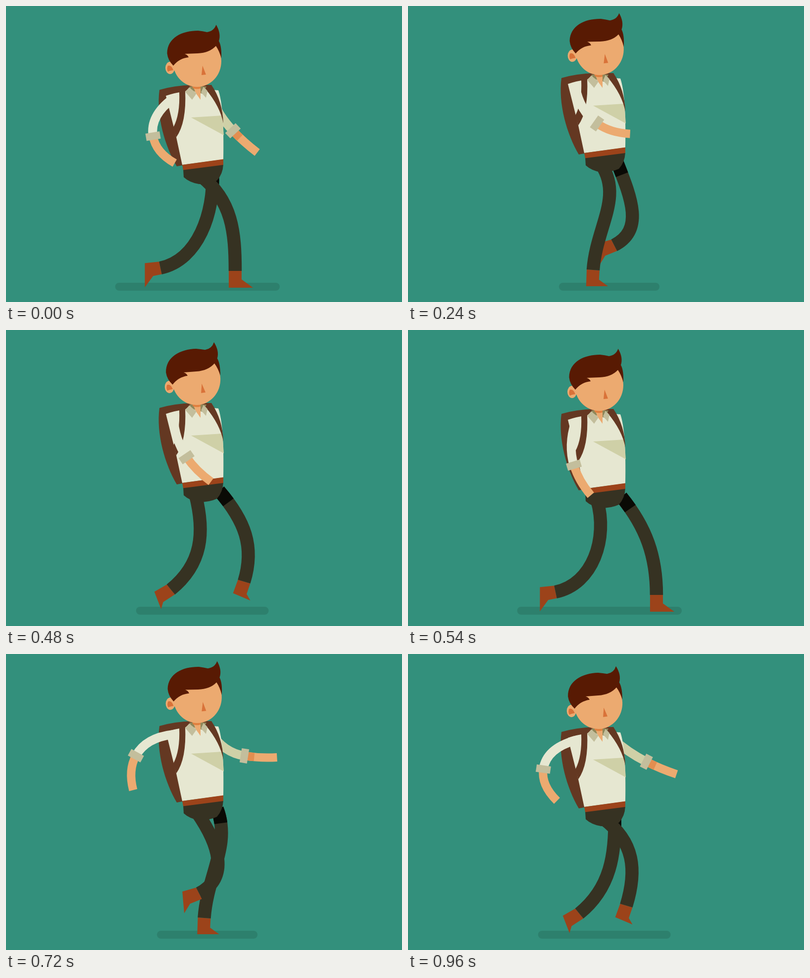
An HTML page with a canvas that plays this animation: 800x600 px, repeating every 1.02 s.

```html
<!DOCTYPE html>
<html lang="en">
<head>
<meta charset="utf-8">
<title>Walk cycle</title>
<style>
html, body { margin: 0; width: 100%; height: 100%; overflow: hidden; background: #33907c; }
canvas { display: block; }
</style>
</head>
<body>
<canvas id="stage" width="800" height="600"></canvas>
<script>
const ctx = document.getElementById('stage').getContext('2d');
const STEP = 60, LOOP = 1020, POSES = 16;
const BACK = '#33907c', SKIN = '#ecaa70', ORANGE = '#d97239', HAIR = '#581a03', PACK = '#643822',
  SHIRT = '#e6e7d1', SHADE = '#cfd0a7', CUFF = '#c3be9c', PANTS = '#363222', LEATHER = '#9c431a';

// Ankle path of one leg: step, x, y, backward lean of the shin in degrees
const STRIDE = [
  [0, 463, 537, 0], [3, 374, 535, 4], [5, 370, 530, 11], [7, 333, 526, 51], [8, 298, 531, 78],
  [9, 339, 511, 77], [11, 390, 485, 63], [13, 405, 487, 60], [15, 441, 510, 17]
];
// Swings as [mean, amplitude, peak step] in degrees; 0 hangs down, + is forward
const NEAR_ARM = { x: 338, y: 187, reach: 87, hand: 70,
  upper: [-15, -56, 12.6], cuff: [13, -47, 12.2], lower: [34, -40, 11.7] };
const FAR_ARM = { x: 414, y: 184, reach: 82, hand: 66,
  upper: [6, 70, 13], cuff: [35, 54, 12.4], lower: [42, 52, 12.3] };

const wave = (i, peak = 0) => Math.cos(2 * Math.PI * (i - peak) / POSES);
const swing = (i, [mean, size, peak]) => mean + size * wave(i, peak);

// Point at a distance and an angle from straight down
function go([x, y], deg, dist) {
  const a = deg * Math.PI / 180;
  return [x + Math.sin(a) * dist, y + Math.cos(a) * dist];
}

function stride(p) {
  const a = STRIDE.findLastIndex(k => k[0] <= p);
  const from = STRIDE[a], to = STRIDE[(a + 1) % STRIDE.length];
  const u = (p - from[0]) / ((to[0] || POSES) - from[0]);
  return from.slice(1).map((v, n) => v + (to[n + 1] - v) * u);
}

function fill(d, color) {
  ctx.fillStyle = color;
  ctx.fill(new Path2D(d));
}

function tube(d, width, color, length) {
  ctx.strokeStyle = color;
  ctx.lineWidth = width;
  ctx.setLineDash(length ? [length, 2000] : []);
  ctx.stroke(new Path2D(d));
}

function leg(i, lift, far) {
  const p = (i + (far ? 8 : 0)) % POSES, planted = p < 6;
  const [x, y, lean] = stride(p);
  // The far leg takes longer steps
  const ankle = [far ? x + 26.5 + 13.5 * wave(p, -1) : x, y];
  const hip = far ? [424 + 7 * wave(p), 338 + lift] : [388 + 6 * wave(p), 345 + lift];
  const thigh = (far ? 21 : 34) + 18 * wave(p) - 8 * wave(p, 4);
  const knee = go(hip, thigh, 80);
  const shin = go(ankle, -lean, -78 - 10 * wave(p, 4));

  // The sole shortens from step to step
  const pitch = planted ? 0 : Math.min(90, 1.35 * lean);
  const sole = 49 - 1.6 * (p % 8);
  const back = go(ankle, 90 - lean, -13), front = go(ankle, 90 - lean, 13);
  const heel = go(back, -(lean + pitch) / 2, planted ? 34 : 29);
  const toe = go(heel, 90 - pitch, sole);
  const notch = go(go(toe, 90 - pitch, 26 - sole), -pitch, (25 - sole) * .7);
  fill(`M${back}L${front}L${notch}L${toe}L${heel}Z`, LEATHER);

  const path = `M${hip}C${knee} ${shin} ${ankle}`;
  tube(path, 26.5, PANTS);
  if (far) tube(path, 26.5, '#0a0a05', 30);
}

function arm(i, lift, a, far) {
  const bend = swing(i, a.cuff);
  const shoulder = [a.x, a.y + lift];
  const wrist = go(shoulder, swing(i, a.upper), a.reach);
  const hand = go(wrist, swing(i, a.lower), a.hand);
  const lower = `M${wrist}Q${go(wrist, bend, 33)} ${hand}`;
  tube(`M${shoulder}Q${go(wrist, bend, -42)} ${wrist}`, 18, far ? SHADE : SHIRT);
  tube(lower, 17, SKIN);
  if (far) tube(lower, 17, '#e38e50', 20);
  tube(`M${go(wrist, bend, -7.5)}L${go(wrist, bend, 7.5)}`, 29, CUFF);
}

function shadow(lift) {
  const left = 220.5 - 3.52 * lift, right = 553 + 1.87 * lift;
  ctx.fillStyle = '#2d806d';
  ctx.beginPath();
  ctx.roundRect(left, 561, right - left, 16, 8);
  ctx.fill();
}

function pack() {
  fill('M310 170Q340 161 378 160L415 160L420 180L356 200L356 323L345 325C321 284 303 222 310 170Z', PACK);
}

function torso() {
  fill('M358 331L439 321Q438 341 426 354Q411 361 390 361Q371 358 359 347Z', PANTS);
  fill('M323 182Q340 176 362 173L372 165L402 166L418 170L429 171Q441 205 439 311L356 322L344 266Z', SHIRT);
  fill('M374 226L437 222L440 262Z', SHADE);
  fill('M356 322L439 310.5V322L358 332.5Z', LEATHER);
  // Straps
  fill('M350 174L362 172Q365 236 344 266L338 246Q352 220 350 174Z', PACK);
  fill('M401 162L415 160Q438 194 439 238Q433 204 403 168Z', PACK);
  // Neck and collar
  fill('M370 163L405 163L398 178L376 172Z', '#8f8759');
  fill('M377 160L393 160L393 190L383 176Z', SKIN);
  fill('M377 160H393V167Q384 170 377 166Z', '#e0803f');
  fill('M370 165L362 174L376 190L385 177Z', CUFF);
  fill('M399 164L407 172L404 186L394 175Z', CUFF);
}

function head(tilt) {
  ctx.save();
  ctx.translate(386, 164);
  ctx.rotate(tilt * Math.PI / 180);
  ctx.translate(-386, -164);
  ctx.fillStyle = SKIN;
  ctx.beginPath();
  ctx.ellipse(386, 112, 49, 52, 0, 0, 7);
  ctx.ellipse(331.5, 125.5, 9.5, 12.5, 0, 0, 7);
  ctx.fill();
  fill('M327 121Q334 119 338 130Q331 131 327 133Q324 127 327 121Z', ORANGE);
  fill('M397 121L404 139L395 140Z', ORANGE);
  fill('M338 121Q327 110 325.5 96C326 64 356 50 388 50Q398 51 406 53Q420 51 424.5 38Q435 56 430 71' +
    'Q436 82 435 106Q431 91 424 81Q411 95 387 96L361 97Q367 99 369 104Q350 106 338 121Z', HAIR);
  ctx.restore();
}

function lifted(y, paint) {
  ctx.save();
  ctx.translate(0, y);
  paint();
  ctx.restore();
}

function draw(i) {
  const k = i % 8;
  const rise = Math.min(1, Math.min(k, 8 - k) / 3);
  const lift = -24 * Math.sin(rise * Math.PI / 2);
  const tilt = k === 0 ? 0 : k < 4 ? .9 : -2;
  ctx.fillStyle = BACK;
  ctx.fillRect(0, 0, 800, 600);
  shadow(lift);
  arm(i, lift, FAR_ARM, true);
  lifted(lift, pack);
  leg(i, lift, true);
  leg(i, lift);
  lifted(lift, () => { torso(); head(tilt); });
  arm(i, lift, NEAR_ARM);
}

const start = performance.now();
function tick() {
  // The contact pose is held for two steps
  const n = Math.floor((performance.now() - start) % LOOP / STEP);
  draw(Math.max(0, n - 1));
  requestAnimationFrame(tick);
}
tick();
</script>
</body>
</html>
```
